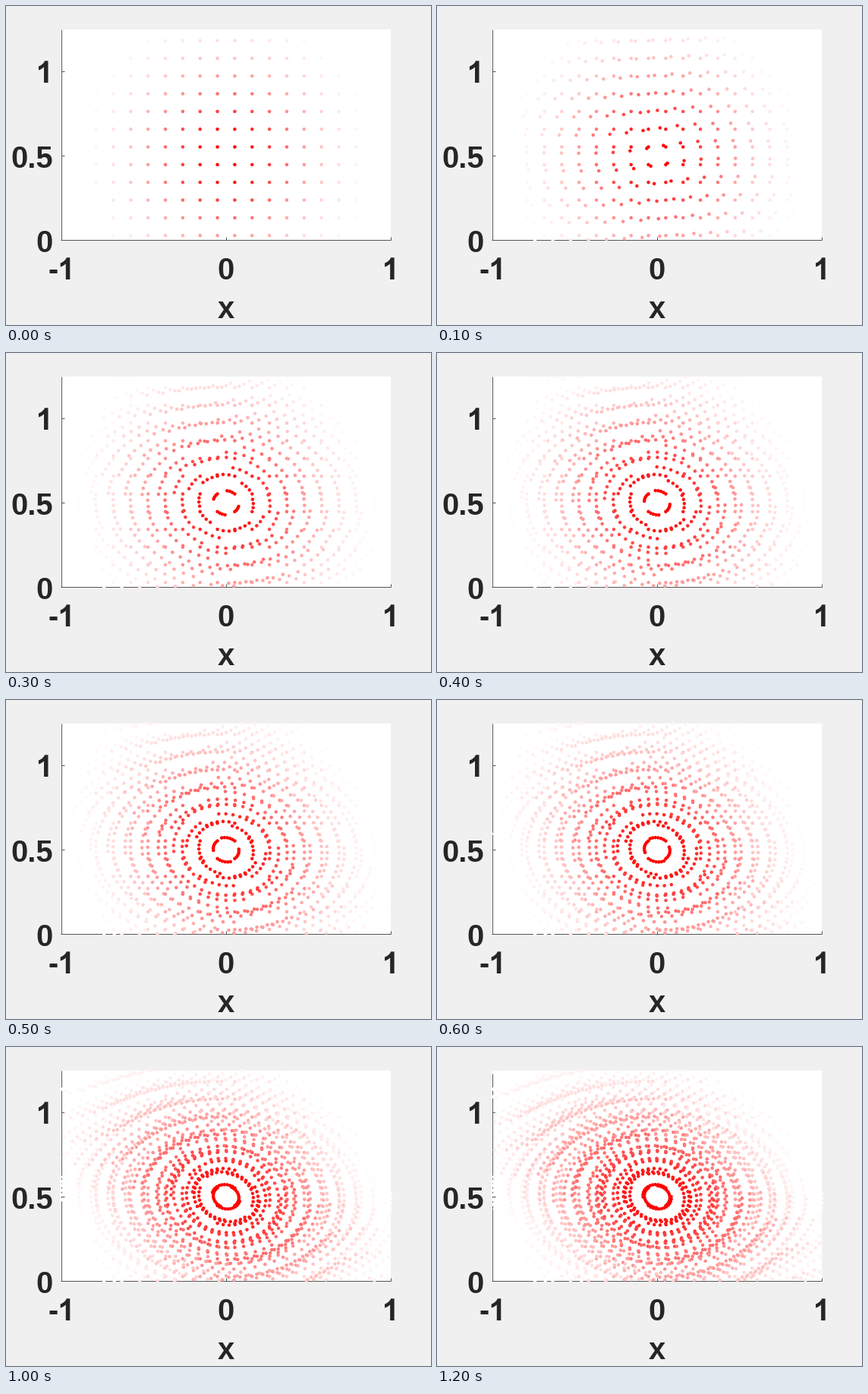
Write a matplotlib script that moves like this. It is 560 px wide and 420 px high and loops after 1300 ms.

```python
import numpy as np
import matplotlib.pyplot as plt
from matplotlib.animation import FuncAnimation

W, H, DPI = 560, 420, 100
PT = 72 / DPI
FRAMES, INTERVAL = 13, 100
LEFT, RIGHT, TOP, BOTTOM = 73, 507, 31, 308
INK = "#262626"

# Softened vortex in a uniform shear
GAMMA, CORE, SHEAR = 0.0335, 0.197, 0.065
CENTRE = 0.5

# Footless digit one, in em units
ONE = np.array([(806, 0), (525, 0), (525, 1059), (440, 985), (310, 900),
                (162, 846), (162, 1101), (280, 1153), (401, 1237),
                (510, 1345), (578, 1472), (806, 1472)]) / 2048
ONE_WIDTH, HYPHEN_WIDTH = 0.556, 0.333


def to_px(x, y):
    px = LEFT + (x + 1) / 2 * (RIGHT - LEFT)
    py = BOTTOM - y / 1.25 * (BOTTOM - TOP)
    return np.column_stack([px, py])


def spin(x, y):
    return GAMMA / (x**2 + y**2 + CORE)


def step(x, y):
    """Semi-implicit step: y first, then x from the new y."""
    y = y + spin(x, y) * x
    x = x - (spin(x, y) + SHEAR) * y
    return x, y


def trails():
    """Visible dots and their colours for every step."""
    axis = np.linspace(-1, 1, 20)
    x, y = (a.ravel() for a in np.meshgrid(axis, axis))
    inside = x**2 + y**2 < 1
    x, y = x[inside], y[inside]
    density = np.exp(-4 * (x**2 + y**2))
    fade = 1 - np.clip((density - 0.03) / 0.95, 0, 1)
    color = np.column_stack([np.ones_like(fade), fade, fade])
    dots, colors = [], []
    for _ in range(FRAMES):
        height = y + CENTRE
        shown = (abs(x) <= 1) & (height >= 0) & (height <= 1.25)
        dots.append(to_px(x[shown], height[shown]))
        colors.append(color[shown])
        x, y = step(x, y)
    return dots, colors


DOTS, COLORS = trails()

fig = plt.figure(figsize=(W / DPI, H / DPI), dpi=DPI, facecolor="#f0f0f0")
ax = fig.add_axes([0, 0, 1, 1])
ax.set(xlim=(0, W), ylim=(H, 0))
ax.axis("off")
ax.add_patch(plt.Rectangle((LEFT - 1, TOP), RIGHT - LEFT + 1, BOTTOM - TOP,
                           fc="white", ec="none", zorder=0))


def line(xs, ys):
    ax.plot(np.array(xs) - 0.5, np.array(ys) - 0.5, color="#555555", lw=PT,
            solid_capstyle="butt", zorder=1)


def label(x, y, text, ha="center", size=40):
    ax.text(x, y, text, ha=ha, va="baseline", color=INK, weight="bold",
            family="Liberation Sans", size=size * PT)


def one(x, y, size=40):
    """Digit one with its left edge at x and its baseline at y."""
    ax.add_patch(plt.Polygon(ONE * [size, -size] + [x, y], fc=INK, ec="none"))


for value in (-1, 0, 1):
    px = round(to_px(value, 0)[0, 0])
    line([px, px], [BOTTOM - 4, BOTTOM])
    if value == 0:
        label(px, 360, "0")
        continue
    width = 40 * (ONE_WIDTH + HYPHEN_WIDTH * (value < 0))
    if value < 0:
        label(px - width / 2 + 20 * HYPHEN_WIDTH, 360, "-")
    one(px + width / 2 - 40 * ONE_WIDTH, 360)

for value in (0, 0.5, 1):
    py = round(to_px(0, value)[0, 1])
    line([LEFT, LEFT + 4], [py, py])
    if value == 1:
        one(62 - 40 * ONE_WIDTH, py + 15)
    else:
        label(62, py + 16, str(value), ha="right")

line([LEFT - 0.5, RIGHT + 0.5], [BOTTOM, BOTTOM])
line([LEFT, LEFT], [TOP, BOTTOM])
label(290, 411, "x", size=40)

cloud = ax.scatter([], [], s=(4.5 * PT) ** 2, linewidths=0, zorder=2,
                   clip_on=False)


def draw(i):
    cloud.set_offsets(np.vstack(DOTS[:i + 1]))
    cloud.set_facecolor(np.vstack(COLORS[:i + 1]))
    return (cloud,)


anim = FuncAnimation(fig, draw, frames=FRAMES, interval=INTERVAL,
                     repeat=True, repeat_delay=0)
plt.show()
```
